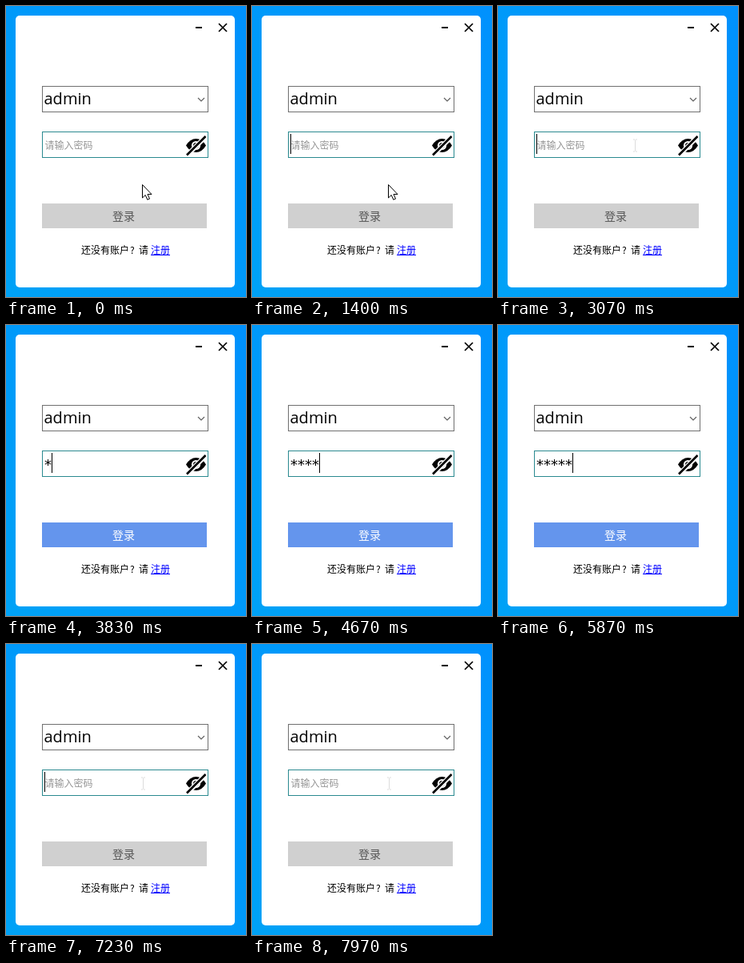
An HTML page for the animation above (8 s loop, 300 by 364 pixels).

```html
<!DOCTYPE html>
<html lang="zh-CN">
<head>
<meta charset="utf-8">
<title>登录</title>
<style>
  html, body { margin: 0; width: 100%; height: 100%; overflow: hidden; }
  svg { display: block; width: 300px; height: 364px; cursor: default; }
  text { font: 12px "Noto Sans CJK SC", "Noto Sans CJK", sans-serif; }
  .line { fill: none; stroke: #000; }
  #user { font: 20px "Open Sans", "Noto Sans", sans-serif; }
  #stars { font: 18px "DejaVu Sans", sans-serif; }
  #label { font-size: 14px; }
</style>
</head>
<body>
<svg viewBox="0 0 300 364">
  <defs>
    <linearGradient id="desk" x1="0" y1="1" x2="1" y2="0">
      <stop offset="0" stop-color="#00a2f6"/>
      <stop offset="1" stop-color="#0091fd"/>
    </linearGradient>
  </defs>
  <rect width="300" height="364" fill="url(#desk)"/>
  <rect x="12" y="12" width="274" height="340" rx="5" fill="#fff"/>
  <path class="line" stroke-width="2" d="M237 27h8"/>
  <path class="line" stroke-width="1.7" d="M266 22l10 10M276 22l-10 10"/>

  <rect class="line" x="45.5" y="100.5" width="207" height="32" style="stroke:#707070"/>
  <text id="user" x="47.5" y="123">admin</text>
  <path class="line" d="M240 115l4 4 4-4" style="stroke:#606060" stroke-width="1.2"/>

  <rect class="line" x="45.5" y="157.5" width="207" height="32" style="stroke:#2b8a90"/>
  <text id="hint" x="48.5" y="178.5" fill="#959595">请输入密码</text>
  <text id="stars" x="48" y="180.5"></text>
  <rect id="caret" y="160" width="1" height="25"/>

  <g id="eye">
    <path d="M225 174.500Q230 166 237.500 166T250 174.500Q245 183 237.500 183T225 174.500Z"/>
    <circle cx="237.500" cy="174.500" r="5.600" fill="#fff"/>
    <circle cx="237.500" cy="174.500" r="3.500"/>
    <path d="M226 187L250 163" stroke="#fff" stroke-width="6"/>
    <path d="M226 186.500L249.500 163" stroke="#000" stroke-width="2.600"/>
  </g>

  <rect id="button" x="45" y="247" width="206" height="31"/>
  <text id="label" x="133" y="268">登录</text>

  <text x="94" y="310">还没有账户</text>
  <text x="155" y="310">?</text>
  <text x="166" y="310">请</text>
  <text x="181" y="310" fill="#00f">注册</text>
  <path d="M181 311.500h24" stroke="#00f"/>

  <path id="arrow" fill="#fff" stroke="#000" stroke-linejoin="round"
        d="M0 0V16.500L3.700 13L6.300 18.800L9 17.600L6.500 12H11.500Z"/>
  <path id="beam" class="line" style="stroke:#dcdcdc" d="M-2.500-7.500h2M.5-7.500h2M0-7V7M-2.500 7.500h2M.5 7.500h2"/>
</svg>
<script>
const LOOP = 8000, BLINK = 500, BLINK_START = 35;
const MOVE_START = 1440, MOVE_END = 1780;
// Times at which a character is typed or deleted
const TYPED = [3750, 4000, 4250, 4500, 4800, 5050];
const DELETED = [5800, 6080, 6350, 6620, 6860, 7100];

const el = id => document.getElementById(id);
const show = (id, on) => el(id).setAttribute("visibility", on ? "visible" : "hidden");
const place = (id, x, y) => el(id).setAttribute("transform", `translate(${x} ${y})`);
const past = (times, t) => times.filter(time => time <= t);

function render(t) {
  const typed = past(TYPED, t), deleted = past(DELETED, t);
  const count = typed.length - deleted.length;
  const empty = count === 0;

  el("stars").textContent = "*".repeat(count);
  show("hint", empty);
  el("button").setAttribute("fill", empty ? "#d0d0d0" : "#6495ed");
  el("label").setAttribute("fill", empty ? "#555" : "#fff");

  // Each keystroke restarts the caret blink
  const lastKey = Math.max(BLINK_START, ...typed, ...deleted);
  const phase = t - lastKey;
  show("caret", phase >= 0 && phase % (2 * BLINK) < BLINK);
  el("caret").setAttribute("x", 48 + 9 * count);

  const p = Math.min(1, Math.max(0, (t - MOVE_START) / (MOVE_END - MOVE_START)));
  const y = Math.round(223 - 49 * p * p * (3 - 2 * p)) + 0.5;
  const inField = t >= 7100 || y < 190;
  const pointerY = t >= 7100 ? 174.5 : y;
  place("arrow", 170.5, pointerY);
  place("beam", 171.5, pointerY);
  show("arrow", !inField);
  show("beam", inField && empty);
}

function frame() {
  render(performance.now() % LOOP);
  requestAnimationFrame(frame);
}
frame();
</script>
</body>
</html>
```
